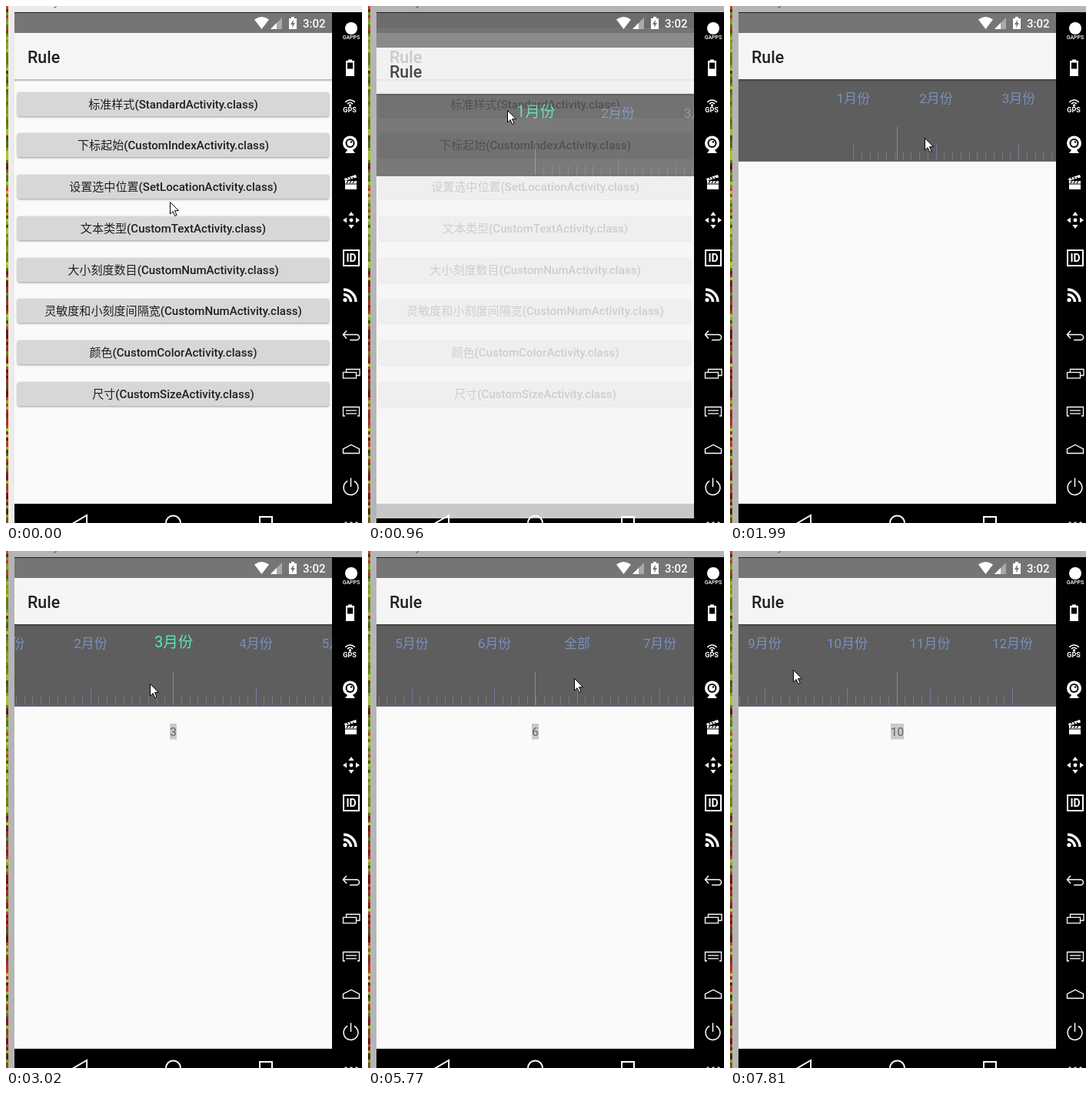
Write an HTML page with a canvas that moves like this. It is 463 by 671 pixels and loops after 8 s.

```html
<!DOCTYPE html>
<html lang="zh">
<head>
<meta charset="utf-8">
<title>Rule</title>
<style>
html, body { margin: 0; width: 463px; height: 671px; overflow: hidden; background: #000; }
canvas { display: block; }
</style>
</head>
<body>
<canvas id="stage" width="463" height="671"></canvas>
<script>
const W = 463, H = 671, LOOP = 8000;
const LEFT = 11, RIGHT = 424, BOTTOM = 646, MID = 217.5, GAP = 107.5;
const STEP = 342.6, OPENING = 3;
const FONT = 'Roboto, "Noto Sans CJK SC", "Noto Sans CJK JP", sans-serif';

const screen = document.getElementById('stage').getContext('2d');
const layerCanvas = document.createElement('canvas');
layerCanvas.width = W;
layerCanvas.height = H;
const layer = layerCanvas.getContext('2d');
let g = screen;

const months = Array.from({ length: 12 }, (_, i) => i + 1 + '月份');
const labels = [...months.slice(0, 6), '全部', ...months.slice(6)];
const buttons = [
  '标准样式(StandardActivity.class)',
  '下标起始(CustomIndexActivity.class)',
  '设置选中位置(SetLocationActivity.class)',
  '文本类型(CustomTextActivity.class)',
  '大小刻度数目(CustomNumActivity.class)',
  '灵敏度和小刻度间隔宽(CustomNumActivity.class)',
  '颜色(CustomColorActivity.class)',
  '尺寸(CustomSizeActivity.class)'
];

// Pointer on its way to the first button: step, x, y
const approach = [[0, 213, 254], [1, 180, 141], [3, 181, 135], [4, 189, 143]];
// Pointer height while dragging: step, y
const heights = [[5, 170], [9, 172], [14, 156], [15, 157], [20, 177], [22, 157], [23, 154]];
// Drags to the left; each pulls one mark into the middle, a long one flings further
const drags = [
  [5, 7, 310, 196], [8, 9, 291, 187], [10, 11, 315, 250], [12, 13, 291, 239], [14, 15, 311, 223],
  [16, 18, 321, 215], [19, 20, 300, 278], [20, 22, 278, 147], [22, 24, 147, 17]
].map(([press, release, from, to]) => ({ press, release, from, to }));
const marksMoved = drag => drag.from - drag.to > 120 ? 3 : 1;

function follow(keys, n, column = 1) {
  const next = keys.findIndex(key => key[0] >= n);
  if (next < 1) return keys.at(next)[column];
  const a = keys[next - 1], b = keys[next];
  return a[column] + (b[column] - a[column]) * (n - a[0]) / (b[0] - a[0]);
}

function stateAt(n) {
  if (n < drags[0].press) {
    return { x: follow(approach, n), y: follow(approach, n, 2), pos: 0 };
  }
  const current = drags.findLast(drag => drag.press <= n);
  const done = drags.filter(drag => drag.release <= n);
  const settled = done.reduce((sum, drag) => sum + marksMoved(drag), 0);
  const x = follow([[current.press, current.from], [current.release, current.to]], n);
  const pulled = n < current.release ? (current.from - x) / GAP : 0;
  return { x, y: follow(heights, n), pos: settled + pulled, value: done.length ? settled : undefined };
}

function box(x, y, w, h, color) {
  g.fillStyle = color;
  g.fillRect(x, y, w, h);
}

function text(str, x, y, size, color, weight = 400, align = 'center') {
  g.font = `${weight} ${size}px ${FONT}`;
  g.textAlign = align;
  g.fillStyle = color;
  g.fillText(str, x, y);
}

function trace(points, closed) {
  g.beginPath();
  points.forEach(([x, y]) => g.lineTo(x, y));
  if (closed) g.closePath();
}

function poly(points, color = '#fff') {
  trace(points, true);
  g.fillStyle = color;
  g.fill();
}

function line(points, width = 1.5, closed = false, color = '#fff') {
  trace(points, closed);
  g.strokeStyle = color;
  g.lineWidth = width;
  g.stroke();
}

function frame(x, y, w, h, width) {
  g.strokeStyle = '#fff';
  g.lineWidth = width;
  g.strokeRect(x, y, w, h);
}

function disc(x, y, r, color = '#fff') {
  g.beginPath();
  g.arc(x, y, r, 0, 7);
  g.fillStyle = color;
  g.fill();
}

function arc(x, y, r, from, to, width = 2) {
  g.beginPath();
  g.arc(x, y, r, from * Math.PI, to * Math.PI);
  g.strokeStyle = '#fff';
  g.lineWidth = width;
  g.stroke();
}

function appFrame(drawBody) {
  const w = RIGHT - LEFT;
  box(LEFT, 9, w, BOTTOM - 9, '#fafafa');
  drawBody();
  box(LEFT, 9, w, 26, '#757575');
  box(LEFT, 35, w, 60, '#f5f5f5');
  for (let i = 0; i < 3; i++) box(LEFT, 95 + i, w, 1, `rgba(0,0,0,${0.27 - i * 0.09})`);
  text('Rule', 28, 74, 21.4, '#212121', 500, 'left');
}

function buttonList(pressed) {
  buttons.forEach((label, i) => {
    const y = Math.round(111.6 + i * 53.75);
    g.save();
    g.shadowColor = 'rgba(0,0,0,.4)';
    g.shadowBlur = 3;
    g.shadowOffsetY = 1;
    g.beginPath();
    g.roundRect(15, y, 405, 31, 2);
    g.fillStyle = pressed && i === 0 ? '#c6c7c7' : '#d6d7d7';
    g.fill();
    g.restore();
    text(label, MID, y + 21, 15.07, '#202020', 500);
  });
}

function ruler(pos, value) {
  box(LEFT, 95, RIGHT - LEFT, 107, '#5e5e5e');
  for (let i = 0; i <= 120; i++) {
    const x = Math.floor(MID + (i / 10 - pos) * GAP);
    const h = i % 10 ? 11 : 22;
    if (x >= LEFT && x < RIGHT) box(x, 200 - h, 1, h, i % 10 ? '#757986' : '#727c9c');
  }
  box(LEFT, 201, RIGHT - LEFT, 1, '#706f88');
  box(217, 157, 1, 43, '#8c8c8c');
  labels.forEach((label, i) => {
    const on = i === pos;
    text(label, MID + (i - pos) * GAP + (on ? 0.7 : 0), on ? 125 : 125.5,
      on ? 19.5 : 17, on ? '#57e8b8' : '#7890c0');
  });
  if (value === undefined) return;
  const reading = labels[value].replace('月份', '');
  g.font = `400 15.2px ${FONT}`;
  const w = Math.round(g.measureText(reading).width);
  box(Math.round(MID - w / 2), 224, w, 20.5, '#c9c9c9');
  text(reading, MID, 240, 15.2, '#5c6160');
}

function statusIcons() {
  g.beginPath();
  g.moveTo(332.5, 30);
  g.lineTo(323, 17.5);
  g.quadraticCurveTo(332.5, 10.5, 342, 17.5);
  g.fillStyle = '#fff';
  g.fill();
  poly([[344, 30], [359, 15], [359, 30]], '#a9a9a9');
  poly([[344, 30], [352, 22], [352, 30]]);
  box(368, 16, 10, 14, '#fff');
  box(371, 14, 4, 2, '#fff');
  poly([[374, 17.5], [370, 24], [372.6, 24], [372, 28.5], [376, 22], [373.5, 22]], '#757575');
  text('3:02', 415.5, 28, 15, '#fff', 500, 'right');
}

function navIcons() {
  line([[105, 661], [87, 671.5], [105, 682]], 2, true);
  arc(217.5, 671, 9.5, 0, 2);
  frame(330, 663, 16, 16, 2);
}

function sideBar() {
  box(RIGHT, 8, W - RIGHT, H, '#000');

  disc(449, 29, 8);
  text('GAPPS', 449, 43, 7, '#fff', 500);

  box(442, 71, 11, 20, '#fff');
  box(445, 69.5, 5, 2, '#fff');
  box(444, 73.5, 7, 8, '#000');

  disc(447.5, 129, 1.7);
  [4.5, 8].forEach(r => arc(447.5, 130, r, 1.22, 1.78, 1.6));
  text('GPS', 447, 138, 9, '#fff', 700);

  disc(447.5, 178, 9.5);
  disc(447.5, 178, 6, '#000');
  disc(447.5, 178, 4);
  disc(449, 176.5, 1.2, '#000');
  poly([[444, 187], [451, 187], [454, 191], [441, 191]]);

  box(441, 227, 15, 11, '#fff');
  poly([[440, 224], [455, 219], [456, 222.5], [441, 227]]);
  for (let x = 443; x < 455; x += 4) {
    line([[x, 222], [x + 2, 225]], 1.3, false, '#000');
    line([[x + 2, 227], [x, 230]], 1.3, false, '#000');
  }
  box(441, 230.5, 15, 1, '#000');

  disc(449, 278, 2.4);
  for (let i = 0; i < 4; i++) {
    g.save();
    g.translate(449, 278);
    g.rotate(i * Math.PI / 2);
    poly([[0, -11], [3.6, -6], [-3.6, -6]]);
    g.restore();
  }

  frame(439, 317, 20, 20, 2);
  text('ID', 449, 332, 14, '#fff', 700);

  disc(441, 381.5, 2.6);
  [9.5, 16].forEach(r => arc(439, 384, r, 1.5, 2, 3.4));

  line([[443, 421.5], [438.5, 426.5], [443, 431.5]]);
  line([[439, 426.5], [456, 426.5]]);
  arc(456, 430, 3.5, -0.5, 0.5, 1.5);
  line([[456, 433.5], [447, 433.5]]);

  line([[442.5, 475], [442.5, 471.5], [460, 471.5], [460, 479.5], [456, 479.5]], 1.3);
  frame(438.5, 475.5, 17, 7.5, 1.3);

  line([[441, 532], [438.5, 532], [438.5, 520.5], [459.5, 520.5], [459.5, 532], [457, 532]], 1.3);
  [525, 529].forEach(y => line([[442, y], [456, y]], 1.3));

  line([[438.5, 580.5], [438.5, 575], [449, 569.5], [459.5, 575], [459.5, 580.5]], 1.4, true);

  arc(448.5, 625, 9.5, -0.35, 1.35, 1.5);
  line([[448.5, 612.5], [448.5, 624]]);

  for (let i = 0; i < 3; i++) disc(442 + i * 7, 671, 1.8, '#ccc');
}

// Sliver of a flower meadow behind the window
function meadow() {
  let seed = 7;
  const random = () => (seed = seed * 16807 % 2147483647) / 2147483647;
  for (let y = 0; y < H; y += 4) {
    const redShare = y > 340 ? 0.75 : y < 30 ? 0.6 : 0.1;
    const hue = random() < redShare ? 8 : 75;
    box(0, y, 3, 4, `hsl(${hue}, 65%, ${20 + random() * 30}%)`);
  }
}

function windowEdge(active) {
  const shade = active ? '#ebebeb' : '#b5b5b5';
  meadow();
  box(3, 0, W, 8, shade);
  box(3, 8, 8, H, shade);
  box(LEFT, 8, W, 1, '#222');
  line([[65.5, 0], [64, 2], [62.5, 2]], 1, false, '#444');
}

function pointer(x, y) {
  g.save();
  g.translate(Math.round(x) + 0.5, Math.round(y) + 0.5);
  const outline = [[0, 0], [0, 15.5], [3.6, 12.2], [6.2, 18], [8.6, 17], [6, 11.2], [11, 11.2]];
  poly(outline);
  line(outline, 1, true, '#000');
  g.restore();
}

function openRuler() {
  box(LEFT, 9, RIGHT - LEFT, BOTTOM - 9, 'rgba(0,0,0,.08)');
  g = layer;
  g.clearRect(0, 0, W, H);
  appFrame(() => ruler(0));
  g = screen;
  g.globalAlpha = 0.8;
  g.drawImage(layerCanvas, 0, 19);
  g.globalAlpha = 1;
}

function draw(time) {
  const n = Math.floor((time - 945) / STEP) + OPENING;
  const { x, y, pos, value } = stateAt(n);
  box(0, 0, W, H, '#000');
  appFrame(() => n > OPENING ? ruler(pos, value) : buttonList(n === 2));
  if (n === OPENING) openRuler();
  windowEdge(n < 2);
  statusIcons();
  navIcons();
  sideBar();
  pointer(x, y);
}

function tick(now) {
  draw(now % LOOP);
  requestAnimationFrame(tick);
}
requestAnimationFrame(tick);
</script>
</body>
</html>
```
